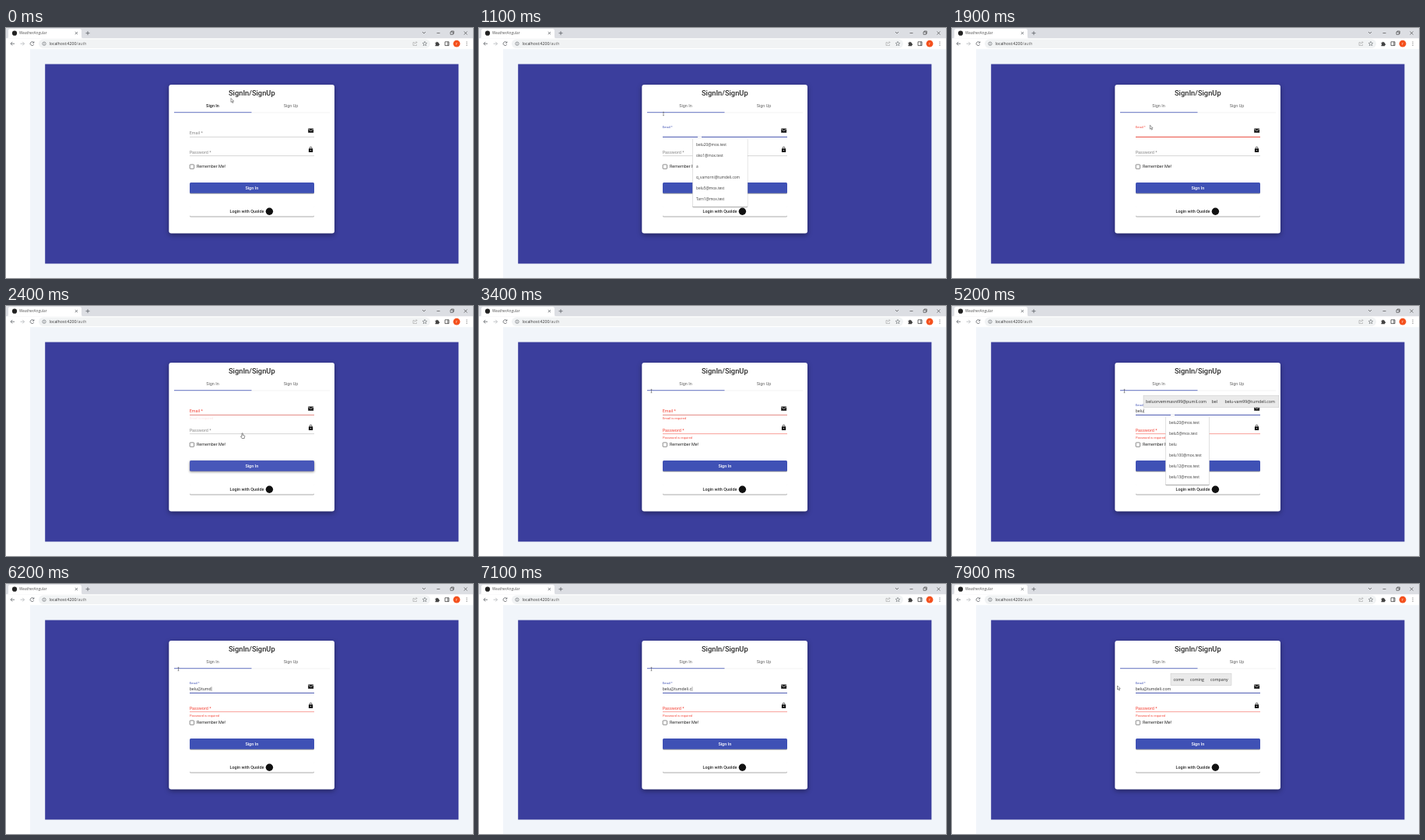
Write an HTML page that moves like this. It is 600x322 px and loops after 8 s.

```html
<!DOCTYPE html>
<html lang="en">
<head>
<meta charset="utf-8">
<title>Sign in form</title>
<style>
  html, body { margin: 0; width: 100%; height: 100%; overflow: hidden; background: #fff; }
  svg { display: block; width: 100vw; height: 100vh; }
  text { font: 5.47px Roboto, sans-serif; fill: #2a2a2a; white-space: pre; }
  .ui, .list text, .words text { font-family: "Open Sans", sans-serif; }
  .bold { font-weight: 500; }
  .mid { text-anchor: middle; }
  .list text { font-size: 4.8px; fill: #3c3c3c; }
  .words text { font-size: 5.25px; }
  .small { font-size: 4.1px; fill: #f44336; }
  .icon { fill: none; stroke: #5f6368; stroke-width: .8; }
  .soft { filter: drop-shadow(0 1px .6px #0005); }
  .raised { filter: drop-shadow(0 1.6px 1.6px #0007); }
</style>
</head>
<body>
<svg viewBox="0 0 600 322" preserveAspectRatio="none">
  <!-- browser frame -->
  <rect width="600" height="13.5" fill="#dcdee3"/>
  <path d="M1 13.5Q3 13.5 3 11V3.5Q3 1 5.5 1H94.5Q97 1 97 3.5V11Q97 13.5 99 13.5Z" fill="#fff"/>
  <circle cx="11" cy="6.7" r="3.1" fill="#222"/>
  <text class="ui" x="17" y="8.3" style="font-size:4.7px;fill:#555">WeatherAngular</text>
  <path class="icon" d="M88.800 5l3.200 3.200m0-3.200l-3.200 3.200M102.500 6.600h5m-2.500-2.500v5"/>
  <path class="icon" d="M535 5l2 2l2-2M553.500 6.500h4M571 5h3.300v3.300h-3.300zM572 5v-1h3.300v3.300h-1M588.500 4.500l4 4m0-4l-4 4" style="stroke:#333;stroke-width:.6"/>
  <rect y="13.500" width="600" height="13.700" fill="#fff"/>
  <rect x="42" y="14.500" width="503" height="11.500" rx="5.700" fill="#f1f3f4"/>
  <path class="icon" d="M11 20.200H6m2.200-2.300L6 20.200l2.200 2.300"/>
  <path class="icon" d="M18.500 20.200h5m-2.200-2.300l2.200 2.300l-2.200 2.300" style="stroke:#b4b7ba"/>
  <path class="icon" d="M35.500 18.700a2.400 2.400 0 1 0 .3 2.300M35.900 17.400v1.800h-1.800"/>
  <circle class="icon" cx="49" cy="20.200" r="2.200" style="stroke-width:.6"/>
  <path class="icon" d="M49 19.800v1.600M49 18.600v.6" style="stroke-width:.6"/>
  <text class="ui" x="55.500" y="22.200" style="font-size:5.200px;fill:#333">localhost:4200<tspan fill="#666">/auth</tspan></text>
  <path class="icon" d="M525 18.500h-2v4h4.500v-1.500M524.500 21q.5-2.500 3.500-2.500m-1.500-1.500l1.500 1.500l-1.500 1.500" style="stroke-width:.45;stroke:#888"/>
  <path class="icon" d="M538 17.300l.8 1.900l2 .2l-1.500 1.300l.5 2l-1.800-1.100l-1.800 1.100l.5-2l-1.500-1.300l2-.2z" style="stroke-width:.55"/>
  <path d="M551.500 18.700h1.300a1 1 0 0 1 2 0h1.300v1.500a1 1 0 0 1 0 2v1h-4.600v-1.200a1 1 0 0 0 0-1.900z" fill="#444"/>
  <path class="icon" d="M564 17.800h5v4.800h-5zM567.800 17.800v4.800" style="stroke:#444"/>
  <circle cx="579" cy="20.200" r="4.400" fill="#f4511e"/>
  <text class="mid" x="579" y="21.700" style="fill:#fff;font-size:4.500px">r</text>
  <path d="M592 18h0M592 20.200h0M592 22.400h0" stroke="#444" stroke-linecap="round"/>

  <!-- page -->
  <rect x="31" y="27.200" width="569" height="295" fill="#f1f5fa"/>
  <rect x="50.200" y="46.500" width="531.200" height="257" fill="#3b3e9d"/>
  <rect x="209.300" y="73.100" width="212.700" height="191.400" rx="3" fill="#fff" style="filter:drop-shadow(0 2.500px 3px #0006)"/>
  <text class="bold mid" x="315.800" y="86.500" style="font-size:9.300px">SignIn/SignUp</text>
  <text class="bold mid" id="tab" x="265.500" y="101.900">Sign In</text>
  <text class="mid" x="366" y="101.900" style="fill:#666">Sign Up</text>
  <path d="M216 109h200" stroke="#ddd" stroke-width=".4"/>
  <path d="M216 108.700h99.500" stroke="#3f51b5" stroke-width=".8"/>

  <text id="emailLabel">Email *</text>
  <text id="value" x="235.700" y="137" style="fill:#444"></text>
  <path id="caret" stroke="#333" stroke-width=".4"/>
  <path d="M236 140.400h160" stroke="#999" stroke-width=".4"/>
  <path id="emailLine"/>
  <path id="staleLine" d="M236 140.400h45" stroke="#a8596f" stroke-width=".8"/>
  <path d="M388.200 129.500h6.900v5.300h-6.900z" fill="#111"/>
  <path d="M388.500 130.300l3.200 2.200l3.200-2.200" fill="none" stroke="#fff" stroke-width=".7"/>
  <text class="small" id="emailError" x="236" y="145.900">Email is required</text>

  <text id="passLabel" x="235.700" y="161.600">Password *</text>
  <path id="passLine" d="M236 164.600h160"/>
  <rect x="388.900" y="155.300" width="5.300" height="4.700" rx=".6" fill="#111"/>
  <path d="M390.200 155.500v-1a1.350 1.350 0 0 1 2.700 0v1" fill="none" stroke="#111" stroke-width=".7"/>
  <circle cx="391.550" cy="157.600" r=".6" fill="#fff"/>
  <text class="small" id="passError" x="236" y="170.700">Password is required</text>

  <rect x="236.200" y="175.900" width="5.400" height="5.400" rx=".6" fill="#fff" stroke="#666" stroke-width=".75"/>
  <text x="245" y="180.300">Remember Me!</text>
  <rect id="button" x="236" y="199" width="160" height="13.800" rx="1.500"/>
  <text class="bold mid" x="315.800" y="207.900" style="fill:#fff">Sign In</text>
  <rect class="soft" x="236" y="228.900" width="160" height="13.700" rx="1.500" fill="#fff"/>
  <text class="bold" x="287.500" y="237.800">Login with Quolde</text>
  <circle cx="338.400" cy="236.300" r="4.700" fill="#111"/>

  <g id="popups"></g>

  <g id="arrow"><path d="M0 0v5l1.200-1l.9 2l.9-.4l-.9-1.900h1.600z" fill="#fff" stroke="#333" stroke-width=".5"/></g>
  <g id="beam"><path d="M-.9-2.200h1.800M0-2.200v4.400M-.9 2.200h1.800" fill="none" stroke="#444" stroke-width=".5"/></g>
  <g id="hand"><path d="M-1-3q.7-.8 1.200 0v2.200l2 .5q.7.400.5 1.300l-.5 2.500h-3l-1.700-2.300q0-.9 1.500-.2z" fill="#fff" stroke="#333" stroke-width=".55"/></g>
</svg>
<script>
const LOOP = 8000, BLUE = '#3f51b5', RED = '#f44336';
const $ = id => document.getElementById(id);
const set = (id, attrs) => Object.entries(attrs).forEach(([k, v]) => $(id).setAttribute(k, v));
const show = (id, on) => { $(id).style.display = on ? '' : 'none'; };
const within = (t, ...spans) => spans.some(([a, b]) => t >= a && t < b);
const ramp = (t, a, b) => Math.max(0, Math.min(1, (t - a) / (b - a)));
const ease = p => p * p * (3 - 2 * p);

function addList(id, width, rows) {
  const texts = rows.map((row, i) => `<text x="279" y="${152.1 + i * 14.05}">${row}</text>`).join('');
  $('popups').innerHTML += `<g id="${id}" class="list"><path d="M281 140.4h5" stroke="#fff" stroke-width="1.5"/>
    <rect x="274.5" y="142" width="${width}" height="88" rx="1" fill="#fff" stroke="#ddd" stroke-width=".4" class="soft"/>${texts}</g>`;
}
function addWords(id, x, width, words) {
  const texts = words.map(([word, left]) => `<text x="${left}" y="125.1">${word}</text>`).join('');
  $('popups').innerHTML += `<g id="${id}" class="words">
    <rect x="${x}" y="115.2" width="${width}" height="15.4" fill="#eaeaea" stroke="#c8c8c8" stroke-width=".5"/>${texts}</g>`;
}

addList('history', 70.5, ['belu20@mox.test', 'oko1@mox.test', 'a',
  'q_vamorni@tumdeli.com', 'belu5@mox.test', 'Tarn1@mox.test']);
addList('matches', 56, ['belu20@mox.test', 'belu5@mox.test', 'belu',
  'belu100@mox.test', 'belu12@mox.test', 'belu13@mox.test']);
addWords('nameWords', 246, 174, [['beluorvemmasni99@pumil.com', 249], ['bel', 333.5], ['belu-vam99@tumdeli.com', 350.5]]);
addWords('endWords', 281, 78, [['come', 284.5], ['coming', 306], ['company', 332]]);

const TYPED = 'belu@tumdeli.com';
const KEYS = [3900, 4100, 4400, 4700, 5400, 5600, 5800, 6000, 6200, 6400, 6500, 6700, 6900, 7100, 7300, 7500];
const PATH = [[0, 289, 90.5], [400, 237, 110.5], [1700, 237, 110.5], [2300, 304, 167],
  [2600, 304, 167], [3400, 221.5, 109.5], [7700, 221.5, 109.5], [7900, 212.5, 131]];

function cursorAt(t) {
  const i = PATH.findIndex(p => p[0] > t);
  if (i < 0) return PATH.at(-1).slice(1);
  const [a, b] = [PATH[i - 1], PATH[i]], p = ease(ramp(t, a[0], b[0]));
  return [a[1] + (b[1] - a[1]) * p, a[2] + (b[2] - a[2]) * p];
}

function draw(t) {
  $('tab').style.fill = t < 600 ? '#222' : '#666';
  $('tab').style.fontWeight = t < 600 ? 500 : 400;

  const float = ease(ramp(t, 600, 900)) - ease(ramp(t, 1900, 2200)) + ease(ramp(t, 3500, 3800));
  const invalid = within(t, [1900, 3900]);
  const colour = invalid ? RED : t < 600 ? '#888' : BLUE;
  const label = $('emailLabel');
  set('emailLabel', { x: 235.7, y: 136.9 - 8.2 * float });
  label.style.fontSize = 5.47 - 1.37 * float + 'px';
  label.style.fill = colour;
  const half = 80 * (invalid ? 1 : float);
  set('emailLine', { d: `M${316 - half} 140.4h${2 * half}`, stroke: colour, 'stroke-width': invalid && float < .5 ? .5 : .9 });
  show('emailLine', t >= 600);
  show('staleLine', within(t, [3900, 4400]));
  show('emailError', within(t, [2400, 3900]));
  $('emailError').style.opacity = .15 + .85 * ramp(t, 2400, 2700);

  const value = $('value');
  value.textContent = TYPED.slice(0, KEYS.filter(k => k <= t).length);
  const end = 236.2 + (value.textContent ? value.getComputedTextLength() : 0);
  set('caret', { d: `M${end} 132.3v5.8` });
  show('caret', within(t, [700, 1000], [1300, 1700], [3600, 7500]));

  const passBad = t >= 2600;
  $('passLabel').style.fill = passBad ? RED : '#888';
  set('passLine', { stroke: passBad ? RED : '#999', 'stroke-width': passBad ? .5 : .4 });
  show('passError', passBad);

  const hover = within(t, [2200, 2800]);
  set('button', { fill: hover ? '#4857b9' : BLUE, class: hover ? 'raised' : 'soft' });

  show('history', within(t, [800, 1900], [3600, 3900]));
  show('matches', within(t, [3900, 5400]));
  show('nameWords', within(t, [4400, 5400]));
  show('endWords', t >= 7300);

  const [x, y] = cursorAt(t);
  const kind = within(t, [2100, 2800]) ? 'hand' : within(t, [300, 1800], [3200, 7700]) ? 'beam' : 'arrow';
  for (const id of ['arrow', 'beam', 'hand']) show(id, id === kind);
  set(kind, { transform: `translate(${x} ${y})` });
}

const start = performance.now();
function tick() {
  const t = (performance.now() - start) % LOOP;
  draw(Math.floor(t / 100) * 100);
  requestAnimationFrame(tick);
}
tick();
</script>
</body>
</html>
```
